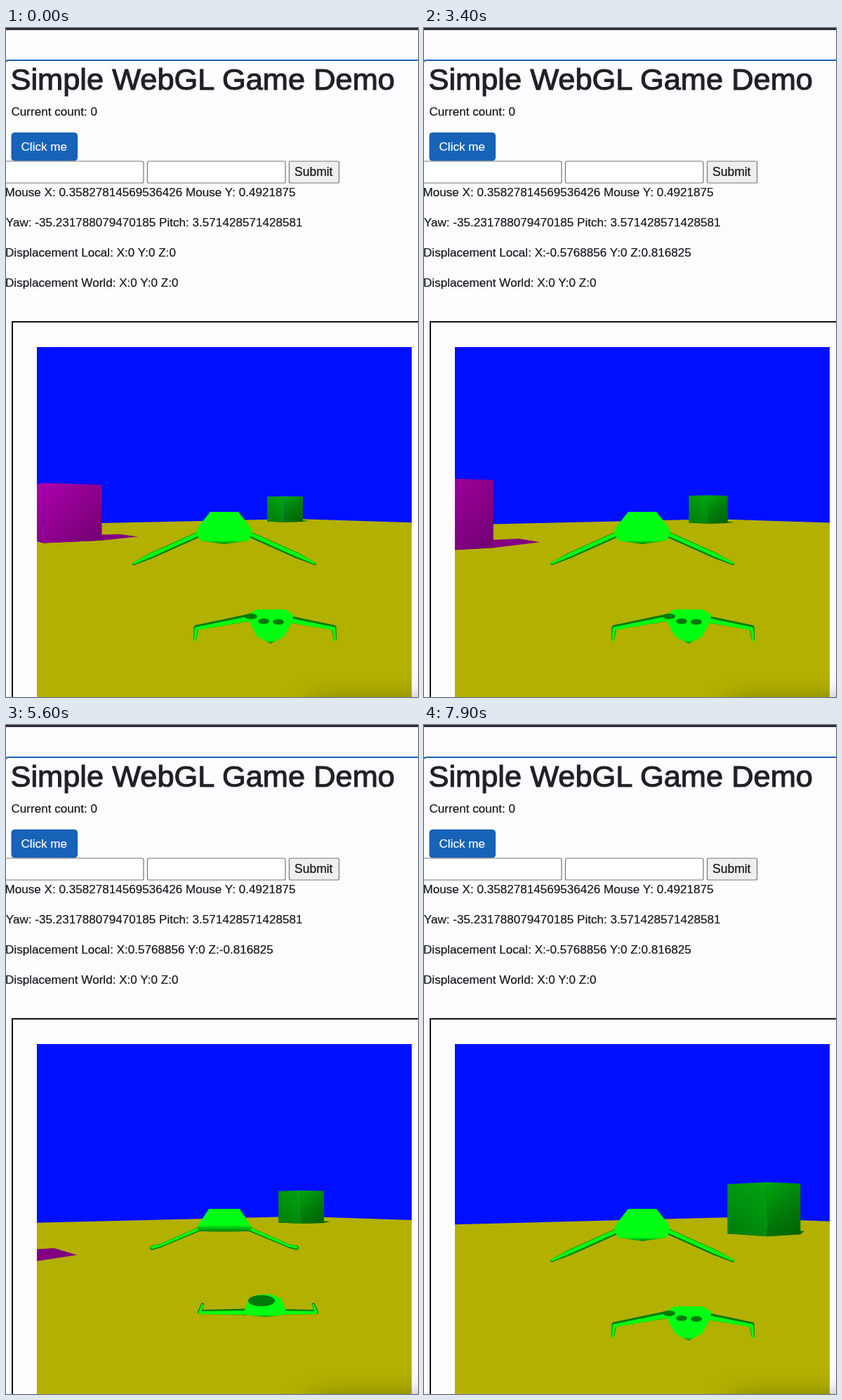
Recreate the animation shown at these times as an HTML page with a canvas. Size 587 by 954 pixels, loop 8000 ms.

```html
<!DOCTYPE html>
<html lang="en">
<head>
<meta charset="utf-8">
<title>Simple WebGL Game Demo</title>
<style>
  html, body { margin: 0; width: 100%; height: 100%; overflow: hidden; background: #fefcff; }
  #stage { position: absolute; left: 0; top: 0; width: 587px; height: 954px; overflow: hidden; }
  svg, canvas { position: absolute; left: 0; top: 0; }
  canvas { left: 44px; top: 455px; }
  text { font: 17.1px "Liberation Sans", Arial, sans-serif; fill: #15171a;
         stroke: #15171a; stroke-width: .2; white-space: pre; }
  .title { font-size: 43.4px; fill: #1e2125; stroke: #1e2125; stroke-width: 1.1; }
  .light { fill: #fff; stroke: #fff; }
  .field { fill: #fff; stroke: #767676; stroke-width: 1.2; }
  #shade { position: absolute; left: 440px; top: 966px; width: 300px; height: 60px;
           box-shadow: 0 0 40px rgba(0, 0, 0, .5); }
</style>
</head>
<body>
<div id="stage">
  <svg width="587" height="954">
    <rect width="587" height="3" fill="#2f2d33"/>
    <path d="M-1 49Q0 46 4 46H590" fill="none" stroke="#1b62b5" stroke-width="2"/>
    <text class="title" x="6.5" y="88">Simple WebGL Game Demo</text>
    <text x="7.5" y="125">Current count: 0</text>
    <rect x="8" y="149.5" width="93.5" height="39.5" rx="4" fill="#1763b8" stroke="#1259a8"/>
    <text class="light" x="21.5" y="175">Click me</text>
    <rect class="field" x="-10" y="190" width="206" height="31" rx="2"/>
    <rect class="field" x="201.5" y="190" width="196.5" height="31" rx="2"/>
    <rect class="field" x="403.5" y="190" width="71" height="31" rx="2" style="fill:#efefef"/>
    <text x="411" y="211" style="font-size:17.5px">Submit</text>
    <text x="-1.5" y="240">Mouse X: 0.35827814569536426 Mouse Y: 0.4921875</text>
    <text x="-.2" y="283">Yaw: -35.231788079470185 Pitch: 3.571428571428581</text>
    <text x="-1" y="326" id="local"></text>
    <text x="-1" y="368.5">Displacement World: X:0 Y:0 Z:0</text>
    <path d="M590 419H9V960" fill="none" stroke="#111" stroke-width="2"/>
  </svg>
  <canvas id="view" width="534" height="499"></canvas>
  <div id="shade"></div>
</div>
<script>
const LOOP = 8000, STEP = 100, SPEED = 6, START_GAP = 8.6;
const FOCAL = 644.6, CX = 311, HORIZON = 682;
const FLOOR = -0.613, TOP = 0.387, PLANE = -2.084;
const SIN = 0.5769, COS = 0.8168;
const BRIGHT = '#00ff12', DARK = '#007a08';

const ctx = document.getElementById('view').getContext('2d');
const label = document.getElementById('local');

// the craft sets off forward, then reverses at each later time
const turns = [2040, 2840, 4304, 7187];

const cubes = [
  { r: -3.011, d: -1.07, lit: '#ac00ac', mid: '#8e008e', dim: '#700070', shadow: '#820082', minGap: 2 },
  { r: 2.302, d: 8.78, lit: '#00a510', mid: '#007e0a', dim: '#006202', shadow: '#006c04', minGap: -8 }
];

// Left halves around cx. wing: x, y, thickness; dark: height share where the hull turns dark.
const poses = {
  glide: [
    { cx: CX, wing: [[-36, 722, 8], [-103, 752, 8], [-129, 764, 4]], lift: -0.8, dark: 0.88,
      hull: [[-20, 690], [-36, 710], [-40, 718], [-35, 731], [0, 736]] },
    { cx: 369, wing: [[-24, 841, 10], [-98, 855, 7], [-100, 872, 4]], lift: 1.5, dark: 0.9,
      hullX: 377, hull: [[-20, 829], [-33, 837], [-29, 850], [-19, 868], [0, 878]],
      spots: [[349, 839, 9, 4], [367, 846, 8, 4], [388, 847, 8, 4]] }
  ],
  thrust: [
    { cx: CX, wing: [[-36, 719, 6], [-92, 743, 5], [-103, 745.5, 6]], lift: -0.6, dark: 0.7,
      hull: [[-22, 690], [-39, 716], [-36, 722], [0, 722.5]] },
    { cx: 359, wing: [[-19, 837, 9], [-83, 837, 6], [-79, 826, 4]], lift: 1, dark: 0.92,
      hullX: 369, hull: [[-9, 812], [-23, 818], [-30, 836], [-23, 842], [0, 844]],
      spots: [[364, 821, 19, 8]] }
  ]
};

function fill(points, style) {
  ctx.beginPath();
  points.forEach(p => ctx.lineTo(p[0], p[1]));
  ctx.closePath();
  ctx.fillStyle = style;
  ctx.fill();
}

function ellipse(x, y, rx, ry, style) {
  ctx.beginPath();
  ctx.ellipse(x, y, rx, ry, 0, 0, 7);
  ctx.fillStyle = style;
  ctx.fill();
}

function blend(from, to, ...colors) {
  const g = ctx.createLinearGradient(...from, ...to);
  colors.forEach((c, i) => g.addColorStop(i / (colors.length - 1), c));
  return g;
}

const project = (r, d, y) => [CX + FOCAL * r / d, HORIZON - FOCAL * y / d];

function drawGround(gap) {
  const r = 12.04, d = 66.5 + gap;
  const left = project(r - 60 * COS, d - 60 * SIN, PLANE);
  const right = project(r + 40 * SIN, d - 40 * COS, PLANE);
  fill([left, project(r, d, PLANE), right, [1200, 1000], [-600, 1000]], '#b2b000');
}

function drawCube(c, gap) {
  if (gap < c.minGap) return;
  const near = [c.r, c.d + gap];
  const left = [near[0] - SIN, near[1] + COS];
  const right = [near[0] + COS, near[1] + SIN];
  const back = [right[0] - SIN, right[1] + COS];
  const low = p => project(p[0], p[1], FLOOR);
  const high = p => project(p[0], p[1], TOP);
  const cast = p => project(p[0] + 0.45, p[1] + 1.04, FLOOR);

  fill([low(near), low(right), cast(right), cast(back), cast(left), low(left)], c.shadow);
  fill([low(left), high(left), high(near), low(near)],
       blend(low(left), high(near), c.mid, c.lit));
  fill([low(near), high(near), high(right), low(right)],
       blend(high(near), low(right), c.lit, c.mid, c.dim));
}

// tapering limb with round joints
function drawLimb(joints, scale, dy, style) {
  joints.forEach(([x, y, w], i) => {
    const h = w * scale / 2;
    ellipse(x, y + dy, h, h, style);
    if (!i) return;
    const [px, py, pw] = joints[i - 1];
    const len = Math.hypot(x - px, y - py);
    const nx = (py - y) / len, ny = (x - px) / len, ph = pw * scale / 2;
    fill([[px + nx * ph, py + ny * ph + dy], [x + nx * h, y + ny * h + dy],
          [x - nx * h, y - ny * h + dy], [px - nx * ph, py - ny * ph + dy]], style);
  });
}

function drawCraft({ cx, wing, lift, dark, hull, hullX = cx, spots = [] }) {
  for (const side of [1, -1]) {
    ctx.save();
    ctx.translate(cx, 0);
    ctx.scale(side, 1);
    drawLimb(wing, 1, 0, DARK);
    drawLimb(wing, 0.65, lift, BRIGHT);
    ctx.restore();
  }
  const mirrored = hull.map(([x, y]) => [-x, y]).reverse();
  const outline = [...hull, ...mirrored].map(([x, y]) => [x + hullX, y]);
  const top = hull[0][1], bottom = hull[hull.length - 1][1];
  const turn = top + (bottom - top) * dark;
  fill(outline, blend([0, turn], [0, bottom], BRIGHT, DARK));
  spots.forEach(s => ellipse(...s, DARK));
}

function stateAt(t) {
  let gap = START_GAP, dir = 0;
  turns.forEach((start, i) => {
    if (t < start) return;
    dir = i % 2 ? -1 : 1;
    gap -= dir * SPEED * (Math.min(t, turns[i + 1] ?? LOOP) - start) / 1000;
  });
  return { gap, dir };
}

function render(t) {
  const { gap, dir } = stateAt(t);
  label.textContent = `Displacement Local: X:${dir * 0.5768856 || 0} Y:0 Z:${-dir * 0.816825 || 0}`;
  ctx.setTransform(1, 0, 0, 1, -44, -455);
  ctx.fillStyle = '#000fff';
  ctx.fillRect(44, 455, 534, 499);
  drawGround(gap);
  cubes.forEach(c => drawCube(c, gap));
  poses[dir > 0 ? 'thrust' : 'glide'].forEach(drawCraft);
}

const begin = performance.now();
function tick() {
  const t = (performance.now() - begin) % LOOP;
  render(Math.floor(t / STEP) * STEP);
  requestAnimationFrame(tick);
}
tick();
</script>
</body>
</html>
```
